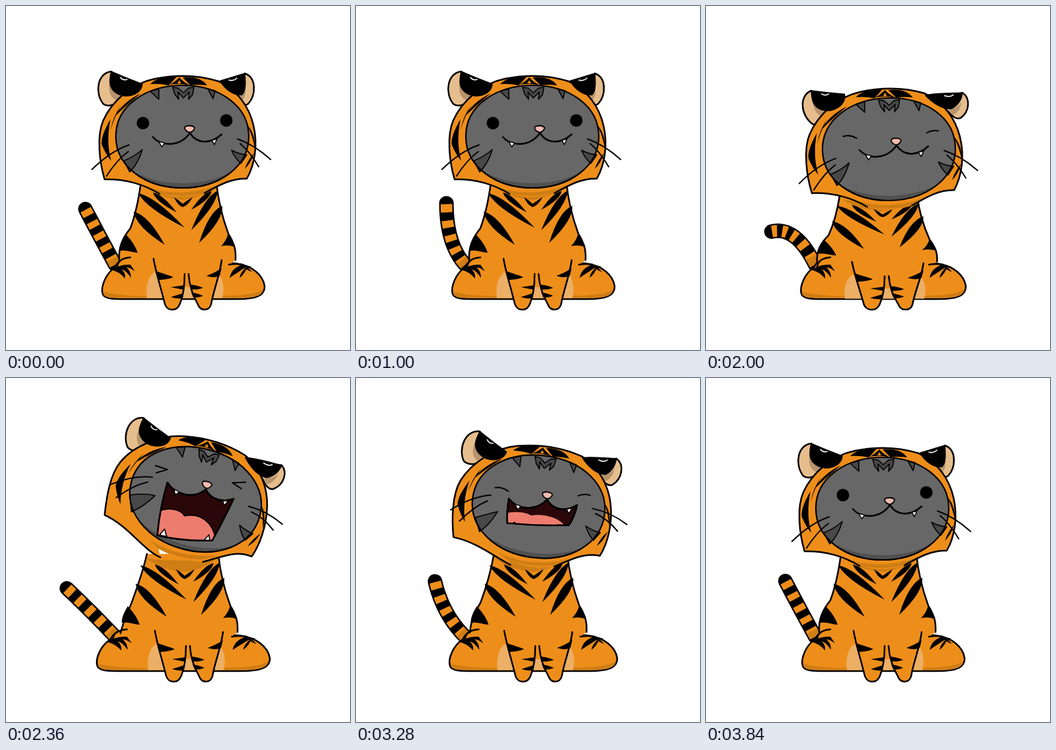
These frames come from a looping animation (520x520 px, 4080 ms). An HTML page with a canvas:

```html
<!DOCTYPE html>
<html lang="en">
<head>
<meta charset="utf-8">
<title>Tiger hood cat</title>
<style>
html, body { margin: 0; width: 100%; height: 100%; overflow: hidden; background: #fff; }
canvas { display: block; width: 520px; height: 520px; }
</style>
</head>
<body>
<canvas id="stage" width="520" height="520"></canvas>
<script>
const ctx = document.getElementById('stage').getContext('2d');
const LOOP = 4080;
const INK = '#000', ORANGE = '#ee8e1a', SHADE = '#cf7d15', CREAM = '#ebaf66';
const TAN = '#e6be8e', TAN_SHADE = '#b8946c', GRAY = '#676767', DARK = '#484848';

function shape(d, fill, stroke, width = 2.5) {
  const path = new Path2D(d);
  if (fill) { ctx.fillStyle = fill; ctx.fill(path); }
  if (stroke) { ctx.strokeStyle = stroke; ctx.lineWidth = width; ctx.stroke(path); }
}

// Mixes two paths that have the same commands.
function blend(from, to, k) {
  const goal = to.match(/-?[\d.]+/g);
  let i = 0;
  return from.replace(/-?[\d.]+/g, n => (+n + (goal[i++] - n) * k).toFixed(2));
}

function group(draw) { ctx.save(); draw(); ctx.restore(); }

function scaleAbout(x, y, sx, sy) {
  ctx.translate(x, y); ctx.scale(sx, sy); ctx.translate(-x, -y);
}

function turnAbout(x, y, degrees) {
  ctx.translate(x, y); ctx.rotate(degrees * Math.PI / 180); ctx.translate(-x, -y);
}

// Tapered stripe: wide near its root, pointed at the far end.
function stripe([x1, y1, x2, y2, w]) {
  const dx = x2 - x1, dy = y2 - y1, len = Math.hypot(dx, dy);
  const nx = -dy / len * w * .85, ny = dx / len * w * .85;
  const mx = x1 + dx * .27, my = y1 + dy * .27;
  shape(`M${x1} ${y1} Q${mx + nx} ${my + ny} ${x2} ${y2} Q${mx - nx} ${my - ny} ${x1} ${y1}Z`, INK);
}

// ---------- poses ----------

const tailSwing = s => ({ tipX: 120 + 19 * s, tipY: 307 - 10 * s, bendX: 142 - 6 * s, bendY: 349 + 12.5 * s });
const rest = { x: 267, y: 197, turn: 0, squash: 0, spread: 0, open: 0, lift: 0, earL: 0, flop: 0, ...tailSwing(0) };
const crouch = { ...rest, x: 277, y: 216, turn: -1, squash: 1, earL: -15, flop: 1,
  tipX: 99, tipY: 341, bendX: 136, bendY: 332 };
const roar = { ...rest, x: 286, y: 187, turn: 14, spread: 1, open: 1, lift: 1, flop: 1,
  tipX: 96, tipY: 320, bendX: 128, bendY: 352 };
const settle = { ...rest, y: 201, lift: .5, earL: 17, flop: .5, ...tailSwing(1.2) };

const keys = [
  [1520, { ...rest, ...tailSwing(1) }],
  [1760, { ...rest, x: 273, y: 207, squash: .45, lift: .5, earL: -6, flop: .5, ...tailSwing(-.1) }],
  [2000, crouch],
  [2080, crouch],
  [2360, { ...roar, x: 287, y: 183, turn: 15, tipX: 92, tipY: 318 }],
  [2520, roar],
  [3120, roar],
  [3440, settle],
  [3680, { ...settle, y: 199, earL: 10, flop: .3, lift: .3, ...tailSwing(-.55) }],
  [3840, rest]
];

function poseAt(t) {
  if (t < 280) return rest;
  if (t <= 1520) return { ...rest, ...tailSwing(Math.sin((t - 250) / 564 * 2 * Math.PI)) };
  const next = keys.findIndex(key => key[0] >= t);
  if (next < 0) return rest;
  const [t0, a] = keys[next - 1], [t1, b] = keys[next];
  const u = (t - t0) / (t1 - t0), k = u * u * (3 - 2 * u);
  const pose = {};
  for (const name in a) pose[name] = a[name] + (b[name] - a[name]) * k;
  return pose;
}

// Twelve drawings per second, each held on a 40 ms grid.
function hold(t) {
  const second = Math.floor(t / 1000) * 1000;
  const step = Math.floor((t - second - 40) / 80);
  return second + (step >= 1 ? 40 + 80 * step : 0);
}

// ---------- body ----------

function drawTail(p) {
  const bx = 165, by = 391;
  const at = u => {
    const v = 1 - u;
    return [v * v * bx + 2 * u * v * p.bendX + u * u * p.tipX, v * v * by + 2 * u * v * p.bendY + u * u * p.tipY];
  };
  const piece = (from, to, width, color, cap = 'butt') => {
    ctx.beginPath();
    for (let i = 0; i <= 16; i++) ctx.lineTo(...at(from + (to - from) * i / 16));
    ctx.lineCap = cap; ctx.lineWidth = width; ctx.strokeStyle = color;
    ctx.stroke();
  };
  piece(0, 1, 22, INK, 'round');
  piece(0, .99, 17.5, ORANGE);
  piece(0, .1, 17.5, SHADE);
  for (const u of [.2, .41, .62, .83]) piece(u - .055, u + .055, 19, INK);
  ctx.lineCap = 'round';
}

const torsoStripes = [
  [222, 282, 258, 312, 9], [200, 283, 270, 335, 13], [193, 311, 240, 361, 15],
  [311, 280, 280, 308, 9], [320, 279, 280, 339, 13], [327, 302, 292, 358, 15]
];

function drawTorso(p) {
  const left = blend('M204 266C200 297 194 320 188 336C176 351 170 364 171 384',
    'M210 266C203 297 194 320 186 342C179 357 174 370 170 386', p.spread);
  shape(left + 'L190 394V430H332V396L347 384C348 364 343 357 336 344C328 322 321 298 318 266Z', ORANGE);
  shape('M208 272C235 277 285 277 316 272C300 287 280 292 265 293C243 291 222 284 208 272Z', SHADE);
  torsoStripes.forEach(stripe);
  shape('M181 345C190 354 196 364 199 373C190 372 180 368 172 370C172 360 177 352 181 345ZM336 343C334 352 330 358 325 363C333 361 340 362 345 364C344 354 340 348 336 343Z', INK);
  shape('M254 289Q262 294 267 299Q274 294 282 289Q276 301 267 304Q259 301 254 289Z', INK);
  shape(left + 'M318 266C321 298 328 322 336 344C343 357 348 364 347 384', null, INK);
}

function drawBody(p) {
  group(() => {
    scaleAbout(270, 443, 1 + .065 * p.spread + .015 * p.squash, 1);
    shape('M188 381C173 381 168 388 165 395C151 404 143 424 146 435C148 443 162 443 180 443L350 443C380 443 391 437 391 424C389 407 372 392 347 389Z', ORANGE, INK);
    shape('M148 432C170 438 205 439 225 439V441.500H170C155 441 149 441 148 432ZM389 428C375 438 340 438 315 438V441.500H355C378 441 387 438 389 428Z', SHADE);
  });
  group(() => {
    ctx.translate(3 * p.spread, 0);
    scaleAbout(272, 400, 1 + .03 * p.squash, 1 - .16 * p.squash);
    drawTorso(p);
  });
  group(() => {
    scaleAbout(268, 443, 1 + .065 * p.spread, 1);
    shape('M188 380C177 381 170 384 168 394M337 391Q347 389 358 391', null, INK);
    shape('M160 399Q172 390 188 391L195 401Q187 395 182 395Q189 401 189 411Q182 400 175 398Q181 404 180 412Q172 402 160 399Z', INK);
    shape('M338 411Q341 396 357 391L372 394Q361 394 353 401Q345 406 338 411ZM353 411Q355 400 365 394Q361 405 353 411ZM364 394L372 402Q366 400 362 397Z', INK);
  });
  drawLegs(p);
}

function drawLegs(p) {
  const outline = 'M223 382C227 405 234 425 240 450C243 461 258 463 263 450C268 438 270 422 270 405M326 384C323 408 314 428 310 451C307 461 294 462 290 451C282 437 277 422 276 405';
  group(() => {
    ctx.translate(2 * p.spread, 0);
    scaleAbout(270, 460, 1 + .05 * p.squash, 1 - .06 * p.squash);
    shape('M224 402C213 411 211 427 213 441.500H245L300 441.500H327C331 427 328 410 319 402L300 425H245Z', CREAM);
    shape('M229 402H318L306 425L293 441Q282 426 276 406H270Q266 430 262 441H240Z', ORANGE);
    shape('M270 424L263 441H270ZM277 424L288 441H277Z', CREAM);
    shape(outline, ORANGE);
    shape('M226 400C234 404 245 406 253 410C245 413 236 414 230 414ZM270 422L249 425L269 429ZM268 434L249 440Q259 443 266 442Z', INK);
    shape('M326 396C318 402 310 405 303 408C312 411 319 410 323 408ZM278 421C288 422 293 424 298 426C290 429 284 429 279 428ZM280 433C288 434 293 436 298 438C291 441 286 441 283 440Z', INK);
    shape(outline, null, INK);
  });
}

// ---------- head ----------

function drawEars(p, front) {
  group(() => {
    turnAbout(185, 135, p.earL);
    if (front) {
      shape('M159 99C175 106 190 112 206 118C205 129 195 136 180 136C165 134 157 125 157 114C157 108 158 104 159 99Z', INK, INK, 1.5);
      shape('M173 108Q177 113 183 111', null, '#fff', 1.6);
    } else {
      shape('M159 99C139 101 133 130 147 148C152 152 160 151 167 147L185 130Z', TAN, INK);
      shape('M157 114C153 130 160 143 170 142L181 134Q160 128 157 114Z', TAN_SHADE);
    }
  });
  if (front) {
    shape(blend('M361 102C348 106 337 109 324 113C330 126 345 136 357 134C363 128 362 114 361 102Z',
      'M379 114C362 115 342 113 323 117C333 128 348 139 362 138C374 132 378 124 379 114Z', p.flop), INK, INK, 1.5);
    shape(blend('M337 112Q344 114 349 109', 'M352 118Q360 121 365 117', p.flop), null, '#fff', 1.6);
  } else {
    shape(blend('M361 102C379 108 378 135 366 148C360 152 354 150 348 143L335 125Z',
      'M379 114C391 122 390 142 376 152C370 155 363 150 358 143L340 127Z', p.flop), TAN, INK);
    shape(blend('M361 120Q361 133 347 135L354 145Q365 138 361 120Z',
      'M378 126Q374 137 358 138L364 148Q376 142 378 126Z', p.flop), TAN_SHADE);
  }
}

function drawHood(p) {
  const edge = blend(
    'M232 284C210 270 180 261 149 262C141 235 137 196 147 173C160 144 190 117 225 110C255 104 290 104 322 114C352 128 368 155 374 180C381 210 376 240 364 261C340 260 320 272 300 283',
    'M238 296C210 292 178 262 140 256C136 230 132 196 142 173C155 144 190 117 225 110C255 104 290 104 322 114C352 128 368 155 374 180C381 210 378 240 371 259C345 256 330 270 302 286',
    p.open);
  shape(edge + 'Q267 294 232 284Z', ORANGE);
  shape('M212 273Q265 292 322 270L300 283Q265 291 232 284Z', SHADE);
  shape(edge, null, INK);
  shape('M218 118C229 107 244 106 258 107L246 120Q233 117 218 118ZM267 108C285 106 298 111 304 120Q290 118 279 120ZM262 108Q254 116 247 119Q262 116 278 120Q268 115 262 108Z', INK);
  shape('M262 112L259 117H265Z', ORANGE);
  shape('M204 132C186 140 172 153 163 169C173 158 188 145 204 132ZM158 171C148 188 143 202 145 210C149 220 154 228 159 234C154 215 153 195 158 171ZM174 150Q162 166 158 188Q164 167 174 150Z', INK);
  shape('M365 180C374 190 377 203 376 214Q373 198 365 180ZM375 222Q370 238 361 246Q366 232 375 222Z', INK);
}

function drawFace(p) {
  const face = 'M166 197C166 151 211 120 267 120C324 120 367 152 367 197C367 243 322 275 267 275C211 275 166 243 166 197Z';
  shape(face, '#505050');
  group(() => {
    ctx.clip(new Path2D(face));
    shape('M150 191A117 77 0 1 0 384 191A117 77 0 1 0 150 191Z', GRAY);
  });
  const marks = [
    'M252 123L255 133L261 141L260 130L268 139L277 130L276 141L282 134L284 123L276 124L268 131L260 124Z',
    'M218 129L231 141V125ZM305 125L313 140L316 128Z',
    'M341 218Q352 224 364 225L355 238Q346 230 341 218Z',
    blend('M178 234Q195 227 206 217Q200 238 187 251Z', 'M169 217Q190 208 206 208Q194 228 178 241Z', p.open)
  ];
  for (const mark of marks) shape(mark, DARK, INK, 1.6);
  shape(face, null, INK, 2.2);
}

function drawEyes(p, awake) {
  if (awake) {
    ctx.fillStyle = INK;
    for (const [x, y] of [[-60, -20], [66, -24]]) {
      ctx.beginPath(); ctx.arc(x, y, 9.5, 0, 7); ctx.fill();
    }
  } else if (p.open > .5) {
    shape('M-72 -33L-53 -32L-68 -23M66 -44L47 -38L62 -33', null, INK, 2);
  } else {
    shape('M-69 -20Q-59 -23 -49 -17M57 -23Q65 -28 75 -26', null, INK, 2);
  }
}

function drawMouth(p, jaw) {
  const o = p.open;
  const lx = -45 - 3 * o, ly = 1 - 14 * o, rx = 59 - 4 * o, ry = -3 - 12 * o;
  const lip = `M${lx} ${ly}C-32 ${16 - 14 * o} -4 ${16 - 14 * o} 11 ${-5 - 13 * o}C22 ${12 - 16 * o} 42 ${12 - 18 * o} ${rx} ${ry}`;
  if (o > .08) {
    const jlx = lx + (-42 - lx) * o, jly = ly + (68 + jaw - ly) * o;
    const jrx = rx + (40 - rx) * o, jry = ry + (54 + jaw - ry) * o;
    const cavity = `${lip}Q${jrx + 7} ${jry - 27 * o} ${jrx} ${jry}Q${(jlx + jrx) / 2} ${(jly + jry) / 2 + 6 * o} ${jlx} ${jly}Q${lx - 1} ${ly + 42 * o} ${lx} ${ly}Z`;
    shape(cavity, '#2b070a', INK);
    group(() => {
      ctx.clip(new Path2D(cavity));
      ctx.translate(0, jaw);
      ctx.scale(1, o);
      shape('M-52 36C-40 21 -18 21 -10 29C12 18 34 27 45 52L40 74H-48Z', '#ee7c6e', INK, 1.6);
      shape('M-39 67L-34 56L-28 66ZM28 57L33 47L37 56Z', '#fff', INK, 1.6);
    });
    shape(cavity, null, INK);
  } else {
    shape(lip, null, INK);
  }
  group(() => {
    ctx.translate(0, -14 * o);
    shape('M-36 8L-31.500 16L-27 10Z', '#fff', INK, 1.5);
    ctx.translate(-4 * o, 0);
    shape('M44 6L48 12.500L52 4Z', '#fff', INK, 1.5);
  });
  group(() => {
    ctx.translate(10, -12 - 14 * o);
    shape('M-7 -1C-6 -5 6 -5 8 -1C8 3 3 6 1 6C-2 6 -7 3 -7 -1Z', '#efb9ae', INK, 1.8);
  });
}

function drawWhiskers(p, shake) {
  const mix = (a, b) => a + (b - a) * p.lift;
  const whisker = (a, b, bow, dy = 0) => {
    const [x1, y1, x2, y2] = a.map((v, i) => mix(v, b[i]));
    shape(`M${x1} ${y1}Q${(x1 + x2) / 2} ${(y1 + y2) / 2 - bow} ${x2} ${y2 + dy}`, null, INK, 2);
  };
  whisker([-81, 13, -137, 50], [-72, -15, -130, 12], 9);
  whisker([-82, 23, -115, 60], [-77, -6, -117, 29], 7);
  whisker([83, 4, 133, 35], [80, -10, 136, 3], 7, shake);
  whisker([87, 11, 115, 46], [86, -3, 125, 15], 6, shake);
}

function drawHead(p, t) {
  const roaring = t >= 2600 && t <= 3120;
  const wobble = roaring ? Math.sin((t - 2520) / 240 * 2 * Math.PI) : 0;
  group(() => {
    ctx.translate(p.x, p.y);
    ctx.rotate(p.turn * Math.PI / 180);
    group(() => {
      ctx.translate(-267, -197);
      drawEars(p, false);
      drawHood(p);
      drawEars(p, true);
      drawFace(p);
    });
    drawEyes(p, t < 1680 || t >= 3760);
    drawMouth(p, 2.5 * wobble);
    drawWhiskers(p, 1.5 * wobble);
  });
}

function render(now) {
  const t = hold(now % LOOP), pose = poseAt(t);
  ctx.fillStyle = '#fff';
  ctx.fillRect(0, 0, 520, 520);
  ctx.lineCap = ctx.lineJoin = 'round';
  drawTail(pose);
  drawBody(pose);
  drawHead(pose, t);
}

const start = performance.now();
function tick() {
  render(performance.now() - start);
  requestAnimationFrame(tick);
}
tick();
</script>
</body>
</html>
```
